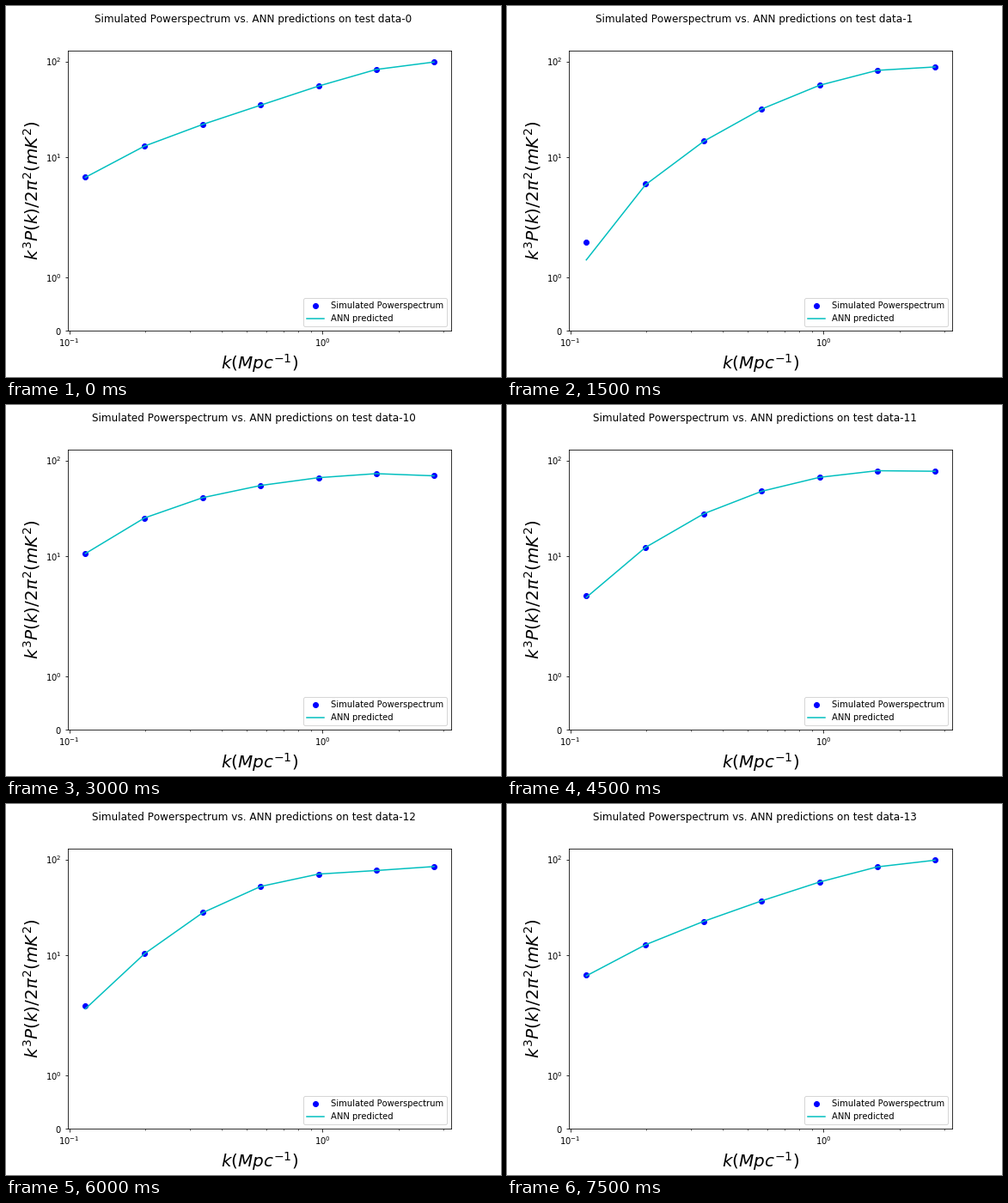
These frames come from a looping animation (576x432 px, 8 s). A matplotlib script:

```python
import numpy as np
import matplotlib.pyplot as plt
from matplotlib.animation import FuncAnimation

plt.rcParams.update({
    "font.family": "DejaVu Sans",
    "font.size": 10,
    "text.kerning_factor": 6,
})

STEP_MS = 500
LOOP_MS = 8000
HOLD_MS = 1500

# Tests come in alphabetical order: 0, 1, 10, 11, ...
TESTS = sorted(range(14), key=str)

# Power at the key bins of each test; a smooth curve fills the others
KEY_BINS = [0, 1, 3, 5, 6]
KEY_POWER = [
    [6.25, 13.1, 35, 82.4, 98.6],
    [1.66, 5.26, 31.9, 80.7, 87.6],
    [10.7, 25.1, 54.8, 72.8, 69.1],
    [3.86, 12.4, 47.7, 78.1, 77.1],
    [2.94, 10.4, 52.3, 76.6, 84.3],
    [6.18, 12.9, 37, 83.6, 98.2],
]

# Nearly logarithmic bins, slightly wider at the low end
bins = np.arange(7)
u = bins / 6
k = 0.1156 * (2.757 / 0.1156) ** u * 10 ** (0.034 * u * (1 - u) ** 2)

fig = plt.figure(figsize=(8, 6), dpi=72, facecolor="white")
fig.subplots_adjust(left=0.125, right=0.9, bottom=0.125, top=0.88)
ax = fig.add_subplot()
ax.set_xscale("log")
ax.set_yscale("symlog", linthresh=2)
scale = ax.yaxis.get_transform()


def simulate(key_power):
    """Power in every bin: a quartic through the key points, as plotted."""
    heights = scale.transform(np.array(key_power, dtype=float))
    curve = np.polyfit(KEY_BINS, heights, 4)
    return scale.inverted().transform(np.polyval(curve, bins))


def predict(power):
    """The network falls short only where the power is small."""
    return power - 0.55 / power


powers = [simulate(p) for p in KEY_POWER]

dots = ax.scatter(k, powers[0], color="b", label="Simulated Powerspectrum")
line, = ax.plot(k, predict(powers[0]), color="c", label="ANN predicted")
ax.set_ylim(0, 130)
ax.set_xlabel(r"$k(Mpc^{-1})$", fontsize=20)
ax.set_ylabel(r"$k^3P(k)/2\pi^2(mK^2)$", fontsize=20)
ax.legend(handles=[dots, line], loc="lower right")
title = fig.suptitle("", fontsize=12)


def update(frame):
    n = frame * STEP_MS // HOLD_MS
    dots.set_offsets(np.column_stack([k, powers[n]]))
    line.set_ydata(predict(powers[n]))
    title.set_text("Simulated Powerspectrum vs. ANN predictions "
                   f"on test data-{TESTS[n]}")
    return dots, line, title


anim = FuncAnimation(fig, update, frames=LOOP_MS // STEP_MS,
                     interval=STEP_MS, repeat=True, repeat_delay=0)
plt.show()
```
